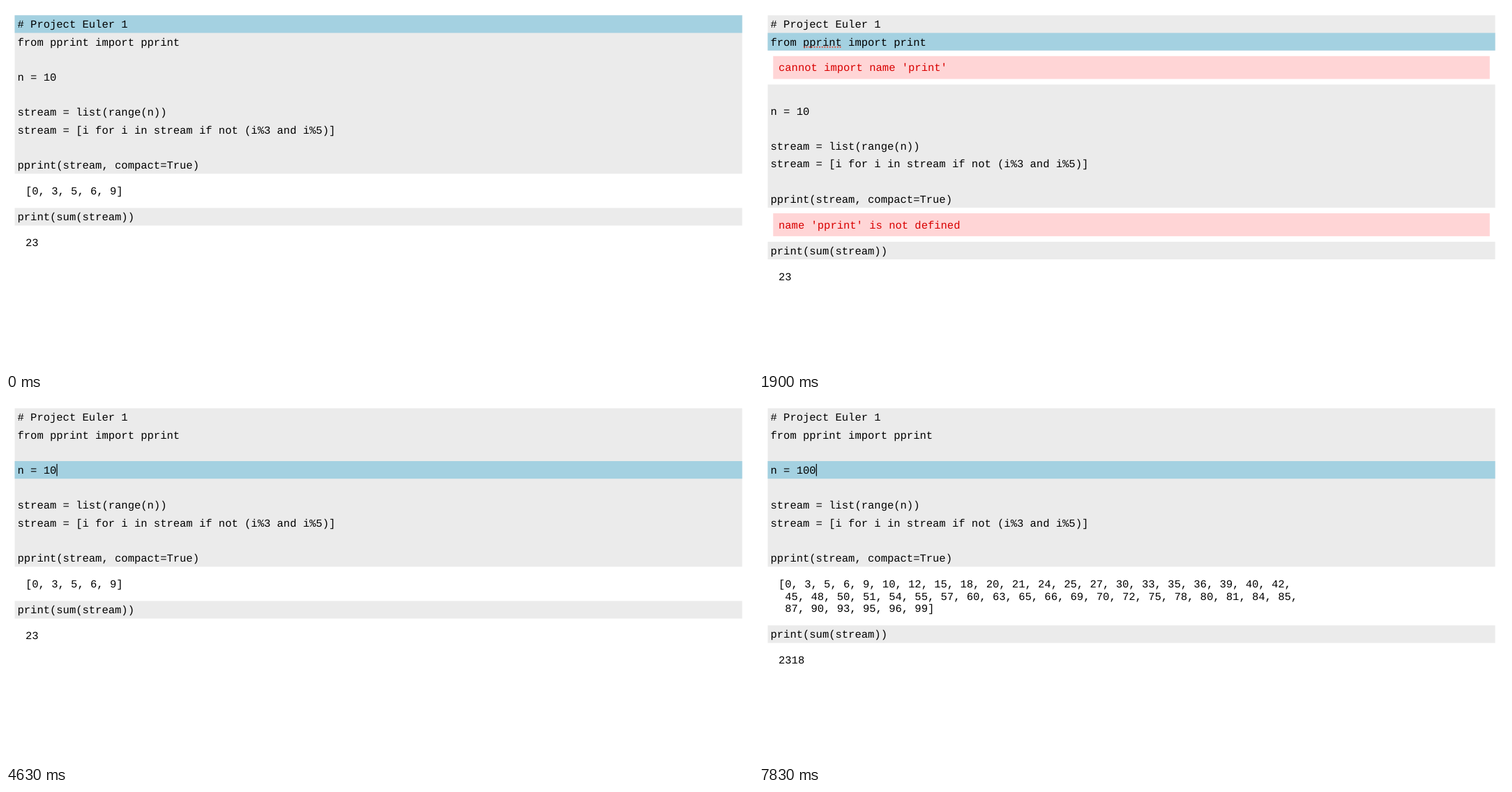
Recreate the animation shown at these times as an HTML page. Size 1071x523 px, loop 8000 ms.

```html
<!DOCTYPE html>
<html lang="en">
<head>
<meta charset="utf-8">
<title>Live notebook</title>
<style>
html, body { margin: 0; width: 100%; height: 100%; overflow: hidden; background: #fff; }
svg { display: block; width: 100vw; height: 100vh; }
text {
  font: 15.5px "Liberation Mono", "Courier New", monospace;
  white-space: pre;
  text-rendering: geometricPrecision;
}
</style>
</head>
<body>
<svg id="stage" viewBox="0 0 1071 523"></svg>
<script>
const LOOP = 8000;
const LEFT = 12.5, WIDTH = 1043, TOP = 13.3;
const ROW = 25.23, OUT_ROW = 17.5, CHAR = 9.302;
const CODE_X = 16.5, OUT_X = 28;
const GRAY = '#ebebeb', BLUE = '#a4d1e1', PINK = '#ffd5d6', RED = '#d90000';

// Each step changes only the fields it names.
const steps = [
  [0, { row: 0, col: 0, caret: false, name: 'pprint', ran: 'pprint', n: 10, ranN: 10 }],
  [130, { row: 1, col: 25, caret: true }],
  [630, { caret: false }],
  [730, { col: 24, caret: true }],
  [900, { col: 23 }],
  [1070, { col: 22 }],
  [1230, { col: 21 }],
  [1730, { caret: false }],
  [1870, { name: 'print', col: 20 }],
  [1900, { ran: 'print' }],
  [2230, { caret: true }],
  [2730, { caret: false }],
  [3230, { caret: true }],
  [3430, { name: 'pprint', ran: 'pprint', col: 21 }],
  [3930, { caret: false }],
  [4230, { row: 2, col: 0, caret: true }],
  [4630, { row: 3, col: 6 }],
  [5130, { caret: false }],
  [5400, { n: 100, ranN: 100, col: 7, caret: true }],
  [5900, { caret: false }],
  [6400, { caret: true }],
  [6500, { n: 10, ranN: 10, col: 6 }],
  [6870, { caret: false }],
  [7400, { caret: true }],
  [7800, { n: 100, col: 7 }],
  [7830, { ranN: 100 }]
];

const stage = document.getElementById('stage');

const rect = (x, y, w, h, fill) =>
  `<rect x="${x}" y="${y}" width="${w}" height="${h}" fill="${fill}"/>`;
const text = (x, y, str, fill = '#000') =>
  `<text x="${x}" y="${y}" fill="${fill}">${str}</text>`;

const multiples = n => [...Array(n).keys()].filter(i => !(i % 3 && i % 5));

// Wraps a list at 80 columns with a one-space hanging indent.
function wrapList(list) {
  const lines = [];
  let line = '[';
  list.forEach((v, i) => {
    const item = v + (i < list.length - 1 ? ',' : ']');
    const gap = i ? ' ' : '';
    if ((line + gap + item).length > 80) {
      lines.push(line);
      line = ' ' + item;
    } else {
      line += gap + item;
    }
  });
  return [...lines, line];
}

function draw(s) {
  let y = TOP, row = 0, svg = '';

  const code = lines => {
    svg += rect(LEFT, y, WIDTH, ROW * lines.length, GRAY);
    for (const line of lines) {
      if (row === s.row) svg += rect(LEFT, y, WIDTH, ROW, BLUE);
      svg += text(CODE_X, y + 18, line);
      if (row === 1 && s.row === 1) {
        svg += `<path d="M64.8 ${y + 20.3}H117" fill="none" stroke="#e0503c" stroke-width="2.2"
          stroke-linecap="round" stroke-dasharray="0 3.7"/>`;
      }
      if (row === s.row && s.caret) {
        svg += rect(CODE_X + s.col * CHAR + 0.1, y + 4, 1.2, 17.5, '#000');
      }
      y += ROW;
      row++;
    }
  };
  const output = lines => {
    lines.forEach((line, i) => svg += text(OUT_X, y + 29.8 + i * OUT_ROW, line));
    y += 31.5 + lines.length * OUT_ROW;
  };
  const error = msg => {
    svg += rect(20.3, y + 8, 1027.4, 32.8, PINK) + text(OUT_X, y + 29.6, msg, RED);
    y += 48.7;
  };

  const failed = s.ran === 'print';
  const list = multiples(s.ranN);
  const head = ['# Project Euler 1', `from pprint import ${s.name}`];
  const body = [
    '', `n = ${s.n}`, '',
    'stream = list(range(n))',
    'stream = [i for i in stream if not (i%3 and i%5)]', '',
    'pprint(stream, compact=True)'
  ];

  if (failed) {
    code(head);
    error("cannot import name 'print'");
    code(body);
    error("name 'pprint' is not defined");
  } else {
    code([...head, ...body]);
    output(wrapList(list));
  }
  code(['print(sum(stream))']);
  output([String(list.reduce((a, b) => a + b))]);
  stage.innerHTML = svg;
}

let shown = -1;
function frame() {
  const t = performance.now() % LOOP;
  const count = steps.filter(([at]) => at <= t).length;
  if (count !== shown) {
    shown = count;
    draw(Object.assign({}, ...steps.slice(0, count).map(([, change]) => change)));
  }
  requestAnimationFrame(frame);
}
frame();
</script>
</body>
</html>
```
